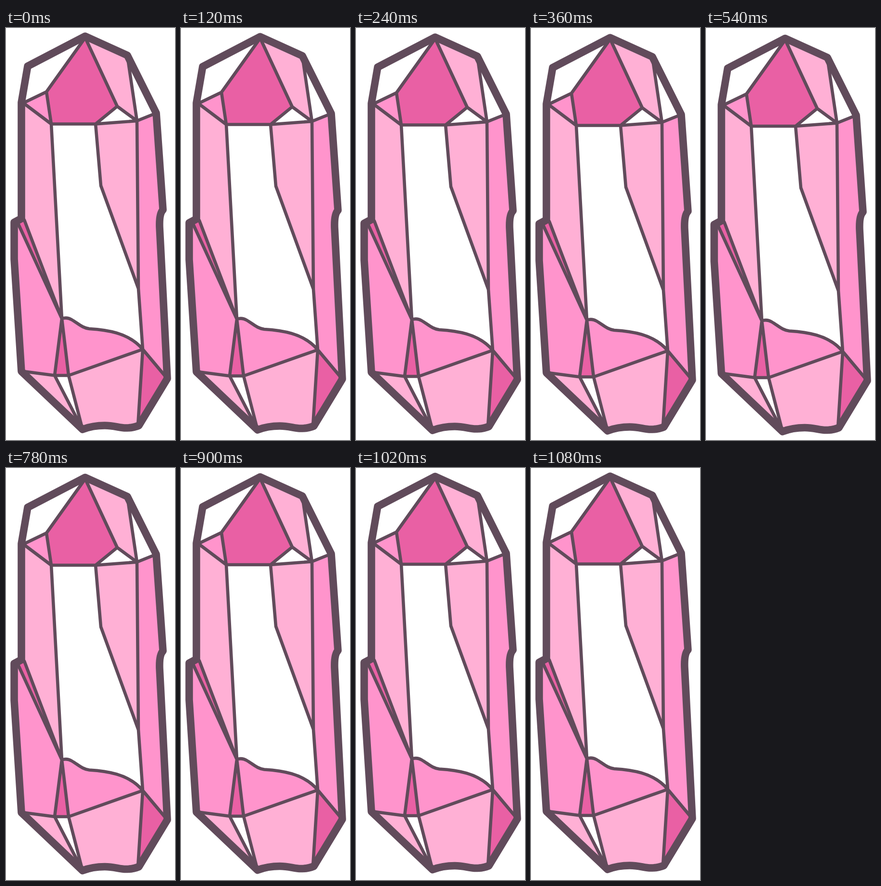
These frames come from a looping animation (351x852 px, 1140 ms). An HTML page:

```html
<!DOCTYPE html>
<html>
<head>
<meta charset="utf-8">
<style>
html, body { margin: 0; height: 100%; overflow: hidden; background: #fff; }
svg { display: block; }
.deep { fill: #e960a4; }
.mid { fill: #ff94cc; }
.light { fill: #ffb0d5; }
.line { fill: none; stroke: #614b5b; stroke-width: 6.6; stroke-linejoin: round; stroke-linecap: round; }
.rim { stroke-width: 15.6; }
</style>
</head>
<body>
<svg width="351" height="852" viewBox="0 0 351 852">
<g id="crystal">
  <path class="light" d="M164.5 20L252 57 272 192 231 162Z
    M34 154L94 198.500 116 601 38 397 32 394Z
    M186 198.500L272 192.500 275 539 197 326Z
    M32 710L101 718.500 159 830Z
    M130 718.500L284 664.500 274 822C266 826 259 827 249 827C235 827 225 822 205 822Q180 822 159 830Z"/>
  <path class="mid" d="M36 155L84 132 94 198.500Z
    M272 192L312 176 326 376Q318 384 319 412L321 450 335 725 284 664.500 275 539Z
    M24 402L17 402V478L32 710 101 718.500 116 601Z
    M116 601C125 598 131 600 136 603C150 611 158 620 173 622C205 624 255 629 284 664.500L130 718.500Z"/>
  <path class="deep" d="M164.500 20L84 132 94 198.500H186L231 162Z
    M38 397L24 402 116 601Z
    M116 601L101 718.500H130Z
    M284 664.500L335 725 274 822Z"/>
  <path class="line" d="M164.500 20L84 132 94 198.500H186L231 162Z
    M84 132L36 155 94 198.500 116 601
    M252 57L272 192 231 162M312 176L272 192 186 198.500 197 326 275 539 284 664.500
    M272 192L275 539
    M38 397L116 601 24 402
    M116 601C125 598 131 600 136 603C150 611 158 620 173 622C205 624 255 629 284 664.500
    M116 601L101 718.500H130Z
    M32 709.500L101 718.500 159 830 130 718.500 284 664.500 335 725
    M284 664.500L274 822"/>
  <path class="line rim" d="M164.500 17L252 56.500 312 176 326 376Q318 384 319 412L321 450 335 725 276 822
    C267 826 259 827 249 827C235 827 225 822 205 822Q180 822 159 830L32 710 17 478V402L32 394V154L45 79Z"/>
</g>
</svg>
<script>
const crystal = document.getElementById('crystal');
const STEP = 60, STEPS = 19, RISE = 0.5;

// The crystal sinks half a pixel per step, then climbs back.
function draw(now) {
  const step = Math.floor(now / STEP) % STEPS;
  crystal.setAttribute('transform', `translate(0 ${RISE * Math.min(step, STEPS - 1 - step)})`);
  requestAnimationFrame(() => draw(performance.now()));
}
draw(0);
</script>
</body>
</html>
```
